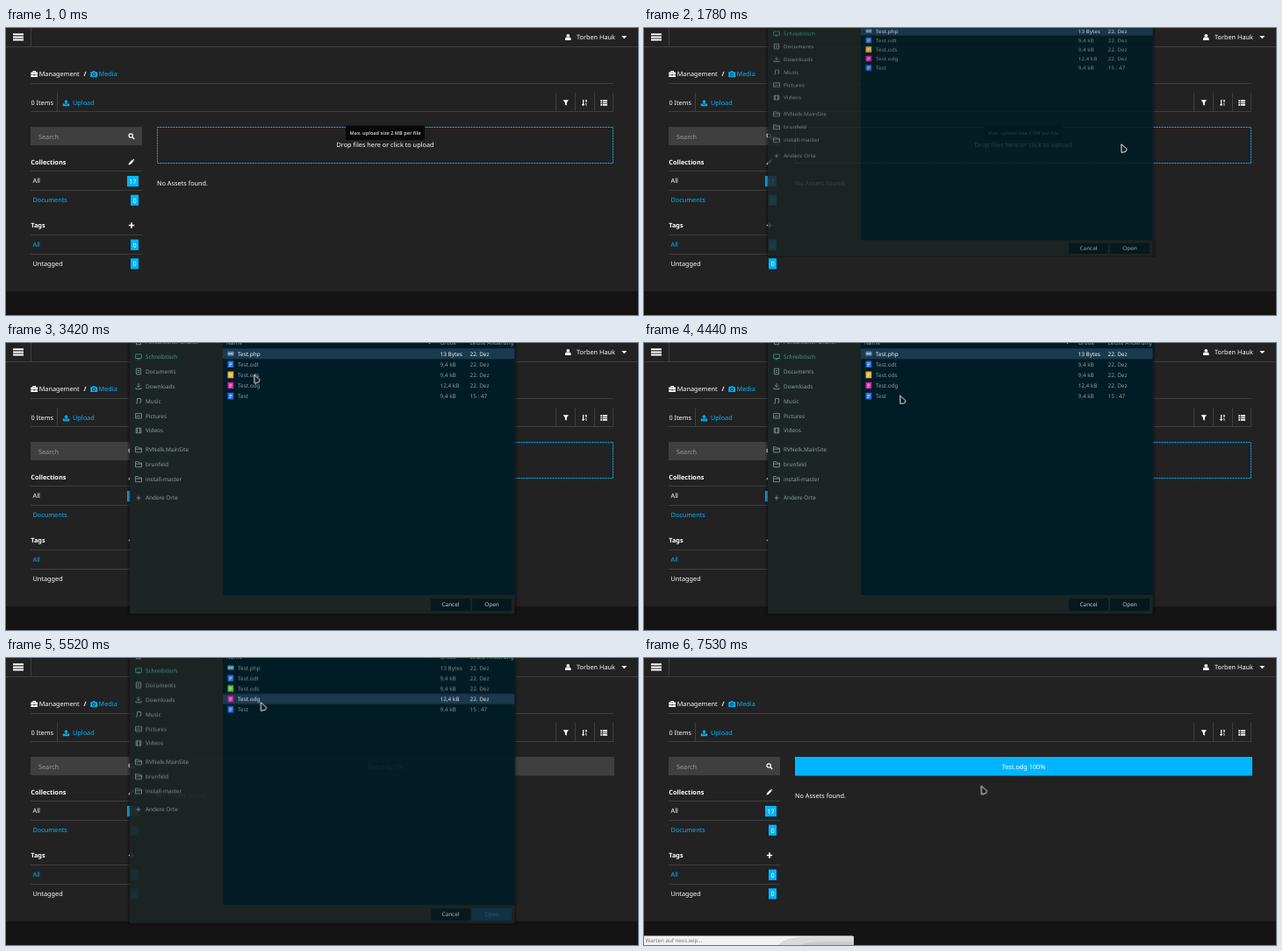
Write an HTML page that moves like this. It is 720 px wide and 328 px high and loops after 8000 ms.

```html
<!DOCTYPE html>
<html lang="en">
<head>
<meta charset="utf-8">
<title>Media upload</title>
<style>
html, body { margin: 0; width: 100%; height: 100%; overflow: hidden; background: #222; }
svg { display: block; width: 720px; height: 328px; }
text { font: 7.3px "Noto Sans", "Open Sans", sans-serif; fill: #fff; text-rendering: geometricPrecision; white-space: pre; }
.b { font-weight: 700; }
.blue { fill: #00b5ff; }
.mid { text-anchor: middle; }
.hint { font-size: 5.5px; font-weight: 600; fill: #bbb; }
.grey { fill: #9a9a9a; }
.line { stroke: #3f3f3f; fill: none; }
.w { fill: #fff; }
.status text { font-size: 6.2px; fill: #777; }
#dialog text { font-size: 6.4px; fill: #8a9c9e; }
#dialog .teal { fill: #3fa092; }
#dialog .btn { fill: #c3cdce; }

.before, .after, .zero, .full, .status, .pick, .lose, .gain, .ods, .openBox, #dialog .openText { animation: 8s step-end infinite; }
.before { animation-name: before; }
.after { animation-name: after; }
.zero { animation-name: zero; }
.full { animation-name: full; }
.status { animation-name: status; }
.pick { animation-name: pick; }
.lose text { animation: lose 8s step-end infinite; }
.gain text { animation: gain 8s step-end infinite; }
.ods { animation-name: ods; }
.openBox { animation-name: openBox; }
#dialog .openText { animation-name: openText; }
#fill { transform-origin: 172px 0; animation: fill 8s linear infinite; }
#dialog { transform-origin: 0 -53px; animation: dialog 8s linear infinite; }
#cursor { animation: move 8s ease-in-out infinite, appear 8s step-end infinite; }

@keyframes before { 0% { opacity: 1 } 66.875%, to { opacity: 0 } }
@keyframes after { 0% { opacity: 0 } 66.875%, to { opacity: 1 } }
@keyframes zero { 0% { opacity: 1 } 71.25%, to { opacity: 0 } }
@keyframes full { 0% { opacity: 0 } 71.25%, to { opacity: 1 } }
@keyframes status { 0% { opacity: 0 } 73%, to { opacity: 1 } }
@keyframes appear { 0% { opacity: 0 } 18.625%, to { opacity: 1 } }
@keyframes pick { 0% { transform: none } 61.25%, to { transform: translateY(36.3px) } }
@keyframes lose { 0% { fill: #f4f8fa } 61.25%, to { fill: #8a9c9e } }
@keyframes gain { 0% { fill: #8a9c9e } 61.25%, to { fill: #f4f8fa } }
@keyframes ods { 0% { fill: #dcae32 } 61.25%, to { fill: #5cb83a } }
@keyframes openBox { 0% { fill: #04191f } 64.875%, to { fill: #10344a } }
@keyframes openText { 0% { fill: #c3cdce } 64.875%, to { fill: #3f6076 } }
@keyframes fill { 0%, 71.25% { transform: scaleX(0) } 74.4%, to { transform: scaleX(1) } }
@keyframes dialog {
  0%, 18.75% { transform: scaleY(0); opacity: 0; animation-timing-function: cubic-bezier(.25,.46,.45,.94) }
  22.25%, 23% { transform: scaleY(.866); opacity: .866 }
  24.5%, 68.1% { transform: none; opacity: 1 }
  68.2% { transform: scaleY(.992); opacity: .95 }
  69% { transform: scaleY(.992); opacity: .95; animation-timing-function: cubic-bezier(.25,.46,.45,.94) }
  71.5%, to { transform: scaleY(0); opacity: 0 }
}
@keyframes move {
  0%, 23% { transform: translate(543px, 132px) }
  28.5% { transform: translate(332px, 60px); animation-timing-function: linear }
  31.125%, 31.625% { transform: translate(308px, 60.5px) }
  33.875%, 38% { transform: translate(281px, 41px) }
  39.75%, 42.6% { transform: translate(281px, 35.5px) }
  43.25%, 50.9% { transform: translate(289.5px, 36px) }
  53.625%, 55.4% { transform: translate(290px, 59.5px) }
  55.5%, 56% { transform: translate(291px, 59.5px) }
  59%, 69% { transform: translate(289.5px, 50px) }
  75.1%, 86.7% { transform: translate(390px, 121.5px) }
  86.75%, 89% { transform: translate(390px, 122.5px) }
  94.1%, to { transform: translate(383.5px, 145.5px) }
}
</style>
</head>
<body>
<svg viewBox="0 0 720 328">
  <rect width="720" height="328" fill="#222"/>
  <rect y="301" width="720" height="27" fill="#141414"/>

  <!-- top bar -->
  <path class="line" d="M0 21.5H720M28.5 0V21"/>
  <path stroke="#fff" stroke-width="2" d="M8 7.2H20M8 10.4H20M8 13.6H20"/>
  <g class="w">
    <circle cx="640.3" cy="8.8" r="1.9"/>
    <path d="M637 14V12.4Q637.2 10.6 638.6 10.4Q640.3 11.8 642 10.4Q643.4 10.6 643.6 12.4V14Z"/>
    <path d="M701.3 9H707.3L704.3 12.2Z"/>
  </g>
  <text x="650" y="13.1">Torben Hauk</text>

  <!-- breadcrumb -->
  <path class="line" d="M28 63.5H692"/>
  <path class="w" d="M28.3 50.6H30.4V49H34V50.6H36V52.9H28.3ZM31.3 50.6H33.1V49.9H31.3ZM28.3 53.4H31.4V54.2H33V53.4H36V56H28.3Z" fill-rule="evenodd"/>
  <text x="37.7" y="55.4">Management</text>
  <text class="b" x="88.6" y="55.4">/</text>
  <path class="blue" d="M96.3 50.3H98.2L98.8 49.2H101.4L102 50.3H104V56H96.3Z"/>
  <circle cx="100.1" cy="53" r="1.6" fill="none" stroke="#222" stroke-width=".9"/>
  <text class="blue" x="105.6" y="55.4">Media</text>

  <!-- toolbar -->
  <path class="line" d="M28 95.5H692M58.5 74V95M626.5 74V95M648.5 74V95M670.5 74V95M691.5 74V95"/>
  <text x="28.4" y="87.7">0 Items</text>
  <path class="blue" d="M68.5 82L71 84.6H69.5V87H67.5V84.6H66ZM64.8 86.6H66.8V87.6H70.2V86.6H72.2V89.2H64.8Z"/>
  <text class="blue" x="76" y="87.7">Upload</text>
  <path class="w" d="M634.6 82.3H641L638.8 85.2V88.8L636.9 87.5V85.2Z"/>
  <path class="w" d="M657 82H658.2V87H659.4L657.6 89.2L655.8 87H657Z"/>
  <text class="b" x="659.6" y="85.2" style="font-size:4.4px">9</text>
  <text class="b" x="659.6" y="89.2" style="font-size:4.4px">1</text>
  <path class="w" d="M677.3 82.2H679.3V84H677.3ZM680 82.2H685V84H680ZM677.3 84.7H679.3V86.3H677.3ZM680 84.7H685V86.3H680ZM677.3 87H679.3V88.7H677.3ZM680 87H685V88.7H680Z"/>

  <!-- side panel -->
  <rect x="28" y="113" width="127" height="21" fill="#3f3f3f"/>
  <text class="grey" x="37" y="126.6">Search</text>
  <circle cx="142.2" cy="123" r="2.2" fill="none" stroke="#fff" stroke-width="1.2"/>
  <path stroke="#fff" stroke-width="1.4" d="M143.8 124.6L146.2 127"/>
  <path class="line" d="M28 163.5H155M28 185.5H155M28 236.5H155M28 258.5H155"/>
  <text class="b" x="28.3" y="155.6">Collections</text>
  <path class="w" d="M139.5 156.4L140 154.4L143.8 150.6L145.4 152.2L141.6 156ZM144.3 150.1L145 149.5L146.5 151L145.9 151.7Z"/>
  <text class="b" x="28.3" y="228.3">Tags</text>
  <path stroke="#fff" stroke-width="1.6" d="M139.8 225.5H146.2M143 222.3V228.7"/>
  <text x="30.5" y="177.3">All</text>
  <text class="blue" x="30.5" y="198.9">Documents</text>
  <text class="blue" x="30.5" y="249.7">All</text>
  <text x="30.5" y="271.5">Untagged</text>
  <g id="badges"></g>

  <!-- drop zone -->
  <g class="before">
    <rect x="172.5" y="113.5" width="519" height="41" fill="none" stroke="#00b5ff" stroke-dasharray="2 1"/>
    <text class="mid" x="432" y="136.4">Drop files here or click to upload</text>
    <rect x="387" y="111.5" width="90" height="16.5" rx="2" fill="#080808"/>
    <text class="mid hint" x="432" y="121.8">Max. upload size 2 MB per file</text>
    <text x="172" y="180.2">No Assets found.</text>
  </g>

  <!-- upload progress -->
  <g class="after">
    <rect x="172" y="113" width="521" height="21.5" fill="#3f3f3f"/>
    <rect id="fill" x="172" y="113" width="521" height="21.5" class="blue"/>
    <text class="mid zero" x="432.5" y="126.5">Test.odg 0%</text>
    <text class="mid full" x="432.5" y="126.5">Test.odg 100%</text>
    <text x="172" y="160">No Assets found.</text>
  </g>

  <g class="status">
    <path fill="#f1f1f1" d="M0 317.5H237Q239 317.5 239 319.5V328H0Z"/>
    <path fill="#dadada" d="M153 328Q160 319.5 182 318.8L239 318.3V328Z"/>
    <path fill="#cbcbcb" d="M178 328Q184 324.4 202 324H239V328Z"/>
    <text x="1.6" y="325.4">Warten auf neos.wip...</text>
  </g>

  <!-- file dialog -->
  <g id="dialog">
    <rect x="138" y="-53" width="445" height="364" opacity=".12"/>
    <rect x="139.5" y="-53" width="441.5" height="363.5" opacity=".25"/>
    <rect x="141" y="-53" width="438.5" height="362.5" fill="#1c2524"/>
    <rect x="247" y="-53" width="332.5" height="341" fill="#001c26"/>
    <rect class="pick" x="247" y="6.2" width="332.5" height="12.1" fill="#1b3a50"/>
    <text x="251" y="2">Name</text>
    <text x="494.5" y="2">Größe</text>
    <text x="528.5" y="2">Letzte Änderung</text>
    <path fill="#8a9c9e" d="M480 -1.5H485L482.5 1.2Z"/>
    <g id="places"></g>
    <g id="files"></g>
    <rect x="484" y="292" width="45" height="14" rx="1" fill="#04191f"/>
    <rect class="openBox" x="531" y="292" width="45" height="14" rx="1"/>
    <text class="mid btn" x="506.5" y="301.3">Cancel</text>
    <text class="mid openText" x="553.5" y="301.3">Open</text>
  </g>

  <path id="cursor" d="M.8 .8L7.2 6.4L5.8 9.3L1 10.4Z" fill="#111a1e" stroke="#eee" stroke-width="1" stroke-linejoin="round"/>
</svg>
<script>
const put = (id, html) => { document.getElementById(id).innerHTML = html; };
const text = (x, y, s, cls = '') => `<text x="${x}" y="${y}" class="${cls}">${s}</text>`;

put('badges', [[169, 17], [190.7, 0], [241.7, 0], [263.3, 0]].map(([y, n]) => {
  const w = n > 9 ? 13 : 9;
  return `<rect class="blue" x="${151 - w}" y="${y}" width="${w}" height="12.2"/>` +
    text(151 - w / 2, y + 8.8, n, 'mid');
}).join(''));

const folder = 'M-3.5 -2.8H-.5L.5 -1.5H3.5V3.2H-3.5ZM-3.5 -.3H3.5';
const icons = {
  home: 'M-3.5 0L0 -3.2L3.5 0M-2.5 0V3H2.5V0',
  desk: 'M-3.3 -2.6H3.3V2H-3.3ZM-1.5 3.2H1.5',
  doc: 'M-2.6 -3.3H2.6V3.3H-2.6ZM-1.2 -1H1.2M-1.2 1H1.2',
  down: 'M0 -3.3V1M-2 -1L0 1L2 -1M-3 1.5V3.2H3V1.5',
  music: 'M-1.5 2.3V-2.8H2.6V1.6M-3 2.6H-1.5M1 2H2.6',
  pic: 'M-3.4 -2.6H3.4V2.8H-3.4ZM-2.4 1.8L-.5 -.5L1 1L2 0',
  film: 'M-2.8 -2.8H2.8V2.8H-2.8ZM-1.4 -2.8V2.8M1.4 -2.8V2.8',
  folder,
  plus: 'M-2.5 0H2.5M0 -2.5V2.5'
};
put('places', [
  [-1.3, 'home', 'Persönlicher Ordner'],
  [15.5, 'desk', 'Schreibtisch'],
  [32.5, 'doc', 'Documents'],
  [49.4, 'down', 'Downloads'],
  [66.3, 'music', 'Music'],
  [83.2, 'pic', 'Pictures'],
  [100, 'film', 'Videos'],
  [121.6, 'folder', 'RVNelk.MainSite'],
  [138.5, 'folder', 'brunfeld'],
  [155.4, 'folder', 'install-master'],
  [177, 'plus', 'Andere Orte']
].map(([y, icon, name]) => {
  const teal = icon === 'desk';
  return `<path transform="translate(151 ${y})" d="${icons[icon]}" fill="none" stroke="${teal ? '#3fa092' : '#8a9c9e'}" stroke-width=".8"/>` +
    text(159, y + 2.3, name, teal ? 'teal' : '');
}).join(''));

put('files', [
  ['Test.php', '13 Bytes', '22. Dez', '#4f7fae', 'lose'],
  ['Test.odt', '9,4 kB', '22. Dez', '#2468d8', ''],
  ['Test.ods', '9,4 kB', '22. Dez', '#dcae32', ''],
  ['Test.odg', '12,4 kB', '22. Dez', '#c522a6', 'gain'],
  ['Test', '9,4 kB', '15 : 47', '#2468d8', '']
].map(([name, size, date, color, cls], i) => {
  const y = 12.2 + 12.1 * i, base = y + 2.3;
  const icon = i
    ? `<rect x="252.5" y="${y - 3.8}" width="6.8" height="7.6" rx=".5" fill="${color}" class="${i === 2 ? 'ods' : ''}"/>
       <path d="M254.2 ${y - 1.4}H257.6M254.2 ${y + .2}H257.6M254.2 ${y + 1.8}H256.6" stroke="#fff" stroke-width=".8" opacity=".8"/>`
    : `<rect x="252.3" y="${y - 2.6}" width="7.4" height="5.2" rx="1" fill="${color}"/>
       <path d="M253.6 ${y}H258.4" stroke="#dfeaf4" stroke-width="1.4" stroke-dasharray="1.2 .6"/>`;
  return `<g class="${cls}">${icon}${text(264, base, name)}${text(494.5, base, size)}${text(528.5, base, date)}</g>`;
}).join(''));
</script>
</body>
</html>
```
